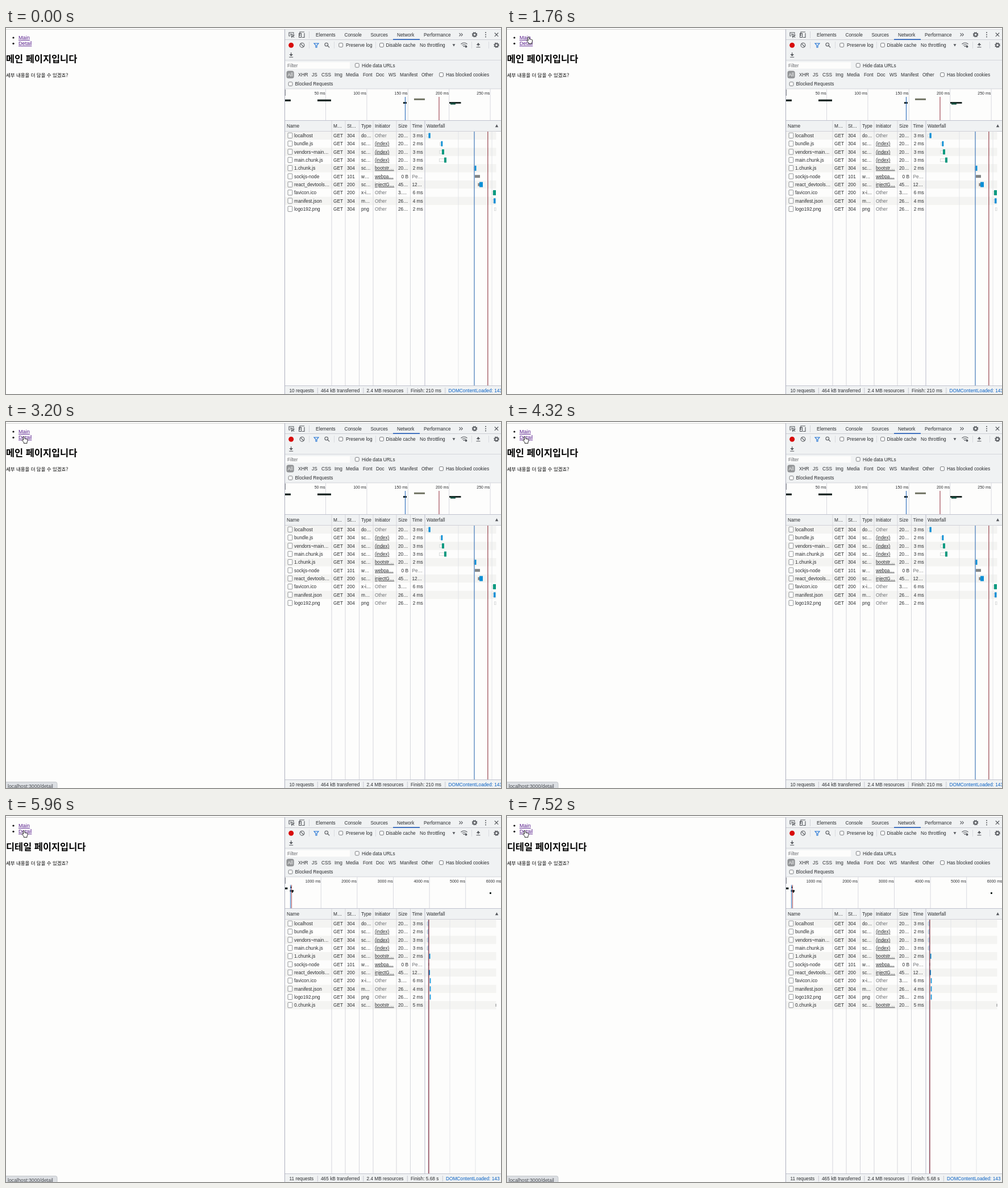
An HTML page that plays this animation: 871 by 643 pixels, repeating every 7.54 s.

```html
<!DOCTYPE html>
<html lang="ko">
<head>
<meta charset="utf-8">
<style>
html, body { margin: 0; width: 100%; height: 100%; overflow: hidden; background: #fdfdfc; }
svg { display: block; }
text { font: 8.3px "Liberation Sans", Arial, sans-serif; fill: #2b2d30; white-space: pre; }
.ko { font: 8.47px "Noto Sans CJK KR", "Noto Sans CJK", sans-serif; fill: #000; }
.h1 { font-size: 16.4px; font-weight: 700; }
.link { font-size: 9.15px; fill: #551a8b; text-decoration: underline; }
.tick { font-size: 7px; }
.u { text-decoration: underline; }
.url { font-size: 8.75px; fill: #4a4d52; }
.line { fill: none; stroke: #55585d; stroke-width: 1.1; }
</style>
</head>
<body>
<svg id="stage" width="871" height="643" viewBox="0 0 871 643"></svg>
<script>
const LOOP = 7540, SWAP = 5180;
const BLUE = '#0b8fd6', GREEN = '#0a9a80', GREY = '#808486', INK = '#16211f', BAR = '#f0f2f3';

const rect = (x, y, w, h, fill, more = '') =>
  `<rect x="${x}" y="${y}" width="${w}" height="${h}" fill="${fill}" ${more}/>`;
const text = (x, y, s, cls = '', more = '') => `<text x="${x}" y="${y}" class="${cls}" ${more}>${s}</text>`;
const right = (x, y, s, cls = '') => text(x, y, s, cls, 'text-anchor="end"');
const path = (d, more = '') => `<path class="line" d="${d}" ${more}/>`;
const circle = (x, y, r, style) => `<circle cx="${x}" cy="${y}" r="${r}" style="${style}"/>`;
const vline = (x, y, h, color = '#d0d2d8', w = 1) => rect(x - w / 2, y, w, h, color);
const box = (x, y) => rect(x - 3.4, y - 3.4, 6.8, 6.8, '#fdfdfc', 'rx="1.5" stroke="#6c6f73" stroke-width=".9"');
const gear = (x, y) => circle(x, y, 2.8, 'fill:none;stroke:#55585d;stroke-width:1.8') +
  circle(x, y, 4.2, 'fill:none;stroke:#55585d;stroke-width:1.3;stroke-dasharray:1.65 1.65');
const each = (list, fn) => list.map(fn).join('');

function page() {
  return rect(0, 2, 490, 1, '#d3d4d3') +
    circle(13, 17, 1.6, 'fill:#111') + circle(13, 27.3, 1.6, 'fill:#111') +
    text(22, 20, 'Main', 'link') + text(22, 30.3, 'Detail', 'link') +
    text(0, 86, '세부 내용을 더 담을 수 있겠죠?', 'ko');
}

function icons() {
  return path('M500 14H498V8H506V10.5M501 10.5L507 12.6L504.3 13.7L503 16.6ZM504.3 13.7L507 16.5') +
    path('M517 14V7H525M515.6 9.5H519.6V16.5H515.6ZM521 16.5H525V9') +
    path('M797.5 9L800 11.7L797.5 14.4M800.8 9L803.3 11.7L800.8 14.4') +
    gear(824.5, 11.7) + each([8, 11.7, 15.4], y => circle(844, y, 1, 'fill:#55585d')) +
    path('M859.8 8.5L866.2 14.9M866.2 8.5L859.8 14.9') +
    circle(501.7, 30.2, 4.5, 'fill:#d80b0b') +
    circle(521, 30.2, 3.9, 'fill:none;stroke:#55585d;stroke-width:1.1') + path('M518.3 27.4L523.8 33') +
    path('M542 27H550L547 30.5V34H545V30.5Z', 'style="stroke:#1a6fd4"') +
    circle(563.8, 29, 2.8, 'fill:none;stroke:#55585d;stroke-width:1.1') + path('M565.8 31L569.2 34.4') +
    path('M785.6 28.2H790.4L788 32.4Z', 'style="fill:#55585d;stroke:none"') +
    path('M800.5 28.2Q806 23.8 811.5 28.2M802.5 30.4Q806 27.6 809.5 30.4M804.5 32.5Q806 31.3 807.5 32.5') +
    circle(809.5, 32.7, 1.9, 'fill:#55585d') +
    path('M827.5 33.8H834.5M831 32V28', 'stroke-width="1.5"') +
    path('M827.7 30L831 26L834.3 30Z', 'style="fill:#55585d;stroke:none"') + gear(863, 30.2) +
    path('M498.2 51.3H505.2M501.7 43V47', 'stroke-width="1.5"') +
    path('M498.4 46L501.7 49.8L505 46Z', 'style="fill:#55585d;stroke:none"');
}

function panel() {
  const tabs = [[545, 'Elements'], [595.5, 'Console'], [641.5, 'Sources'], [688, 'Network'], [735, 'Performance']];
  const kinds = [[514, 'XHR'], [538, 'JS'], [555, 'CSS'], [578, 'Img'], [598, 'Media'], [628, 'Font'],
    [651, 'Doc'], [673, 'WS'], [693, 'Manifest'], [731, 'Other']];
  const heads = [[494, 'Name'], [576, 'M…'], [600, 'St…'], [625, 'Type'], [649, 'Initiator'],
    [690, 'Size'], [714.5, 'Time'], [740, 'Waterfall']];
  return rect(491, 2, 380, 105, BAR) + rect(491, 2, 380, 1, '#d3d4d9') +
    rect(491, 20, 380, 1, '#cbcdd4') + rect(681, 19.4, 47, 1.6, '#1c57b5') +
    each(tabs, ([x, s]) => text(x, 14.6, s)) +
    vline(533.5, 6, 12) + each([533.5, 577.5, 650.5, 819.5, 849.5], x => vline(x, 24, 12, '#d9dbe0')) + icons() +
    box(589.2, 30) + text(598, 33, 'Preserve log') + box(661, 30) + text(668.5, 33, 'Disable cache') +
    text(728, 33, 'No throttling') +
    rect(491, 56, 380, 1, '#d3d5db') + rect(492, 60, 113, 11.5, '#fdfdfc') +
    text(495, 69, 'Filter', '', 'style="fill:#66696d"') +
    box(617.8, 65.6) + text(626, 68.6, 'Hide data URLs') +
    rect(493.5, 75.3, 13.2, 13.2, '#929496', 'rx="3.5"') + text(495.5, 85, 'All', '', 'style="fill:#fff"') +
    each(kinds, ([x, s]) => text(x, 85, s)) +
    box(766, 82) + text(774, 85, 'Has blocked cookies') + box(500.5, 98.3) + text(508.5, 101.3, 'Blocked Requests') +
    rect(491, 106.5, 380, .8, '#cbcdd4') + rect(491, 162, 380, 19.5, BAR) +
    rect(491, 162, 380, 1, '#c0c2ce') + rect(491, 181, 380, 1, '#c6c8d0') +
    each(heads, ([x, s]) => text(x, 175, s)) +
    path('M860.8 174.3H866.2L863.5 169.3Z', 'style="fill:#55585d;stroke:none"') +
    rect(491, 628, 380, 15, BAR) + rect(491, 628, 380, 1, '#c0c2ce') +
    vline(490.5, 2, 641, '#aeb0bf');
}

const files = [
  ['localhost', 304, 'do…', 'Other', '20…', '3 ms'],
  ['bundle.js', 304, 'sc…', '(index)', '20…', '2 ms'],
  ['vendors~main…', 304, 'sc…', '(index)', '20…', '3 ms'],
  ['main.chunk.js', 304, 'sc…', '(index)', '20…', '3 ms'],
  ['1.chunk.js', 304, 'sc…', 'bootstr…', '20…', '2 ms'],
  ['sockjs-node', 101, 'w…', 'webpa…', '0 B', 'Pe…'],
  ['react_devtools…', 200, 'sc…', 'injectG…', '45…', '12…'],
  ['favicon.ico', 200, 'x-i…', 'Other', '3.…', '6 ms'],
  ['manifest.json', 304, 'm…', 'Other', '26…', '4 ms'],
  ['logo192.png', 304, 'png', 'Other', '26…', '2 ms'],
  ['0.chunk.js', 304, 'sc…', 'bootstr…', '20…', '5 ms']
];

function table(count, bars, grid) {
  const top = i => 181.8 + i * 14.34;
  const row = ([name, status, type, from, size, time], i) => {
    const y = top(i) + 10.1, gray = 'style="fill:#6f7276"';
    return rect(496, y - 7.7, 7.8, 9.2, '#fdfdfc', 'rx="1" stroke="#85888c" stroke-width=".9"') +
      text(507, y, name) + text(576, y, 'GET') + text(600, y, status) + text(625, y, type) +
      (from == 'Other' ? text(649, y, from, '', gray) : text(649, y, from, 'u')) +
      (size == '0 B' ? right(708, y, size) : text(690, y, size)) +
      (time.endsWith('…') ? text(714.5, y, time, '', time == 'Pe…' ? gray : '') : right(733.7, y, time));
  };
  let out = '';
  for (let i = 0; i < count; i += 2) out += rect(491, top(i), 371.5, 14.34, '#f4f4f2');
  out += each([573, 597, 621.5, 646, 687, 711.5], x => vline(x, 163, 465, '#d5d6dc')) + vline(737, 163, 465, '#b9bbc9');
  out += each(grid, x => vline(x, 182, 446, '#e1e2e6', .9));
  out += each(files.slice(0, count), row);
  // each bar: row, waiting start, active start, end, colour
  return out + each(bars, ([i, wait, x, end, color, h = 9]) =>
    (wait < x ? rect(wait, top(i) + 5, x - wait, 5, '#fdfdfc', 'stroke="#c9cccd" stroke-width=".7"') : '') +
    rect(x, top(i) + 7.2 - h / 2, end - x, h, color));
}

function overview(ticks, step, first, unit) {
  let out = '';
  for (let i = 0; i < ticks; i++) {
    const x = first + i * step;
    out += vline(x, 107, 55, '#d9dae0') + right(x - .8, 117, `${(i + 1) * unit} ms`, 'tick');
  }
  return out + vline(491.5, 108, 11, '#8d9094');
}

function footer(cells) {
  return each(cells, ([x, s], i) => (i ? vline(x - 5.7, 632, 10, '#c6c8d0') : '') +
    text(x, 640.2, s, '', s.startsWith('DOM') ? 'style="fill:#0b62c4"' : ''));
}

function before() {
  const bars = [[0, 740.5, 743.5, 746.8, BLUE], [1, 763.5, 765.5, 768.3, BLUE], [2, 763, 767, 771, GREEN],
    [3, 762.5, 771, 775, GREEN], [4, 823, 824.5, 827.5, BLUE], [5, 825, 825, 834, GREY, 5],
    [6, 830.5, 833, 839, BLUE], [7, 855, 857, 862, GREEN], [8, 856, 858, 861.5, BLUE], [9, 859.5, 862, 862, GREY]];
  return text(0, 60.3, '메인 페이지입니다', 'ko h1') + overview(5, 72.4, 562.5, 50) +
    rect(491, 125.6, 10, 3.2, INK) + rect(548, 125.6, 24, 3.2, INK) + rect(699, 130, 6, 3, INK) +
    rect(718, 123.8, 19, 2.9, '#6d705f') + rect(780, 130, 20.5, 2.8, INK) + rect(782, 131.5, 9, 3, '#124f40') +
    vline(702.5, 121, 41, '#3a76c0', 1.2) + vline(762, 121, 41, '#a34c58', 1.2) +
    table(10, bars, [796, 855]) + rect(830.5, 272.7, 2.5, 5, GREY) +
    vline(824, 182, 446, '#4f82bd', 1.3) + vline(847.8, 182, 446, '#a0525c', 1.3) +
    footer([[498.5, '10 requests'], [554, '464 kB transferred'], [634.5, '2.4 MB resources'],
      [712, 'Finish: 210 ms'], [778.5, 'DOMContentLoaded: 143 ms']]);
}

function after() {
  const bars = [];
  for (let i = 0; i < 4; i++) bars.push([i, 740.3, 742, 743.5, '#7fb9e2']);
  bars.push([4, 744.5, 744.5, 746.5, BLUE], [5, 743, 743, 744.5, GREY, 5], [6, 743, 743, 746, BLUE]);
  for (let i = 7; i < 10; i++) bars.push([i, 745.7, 745.7, 747.4, BLUE]);
  bars.push([10, 861.5, 861.5, 862.5, GREY, 5]);
  return text(0, 60.3, '디테일 페이지입니다', 'ko h1') + overview(6, 63.6, 554.3, 1000) +
    rect(491, 125.6, 4.5, 3.2, INK) + rect(499.5, 130, 6.5, 3.2, INK) + rect(502, 132, 3, 2.6, INK) +
    rect(500, 124, 3, 2.5, INK) + rect(851, 134, 2.8, 3, INK) +
    vline(500.5, 121, 41, '#3a76c0') + vline(502.5, 121, 41, '#a34c58') +
    table(11, bars, [781, 826]) +
    vline(743, 182, 446, '#a9b4cf', .6) + vline(743.9, 182, 446, '#8d3e4c', 1.4) +
    footer([[498.5, '11 requests'], [554, '465 kB transferred'], [634.5, '2.4 MB resources'],
      [712, 'Finish: 5.68 s'], [774, 'DOMContentLoaded: 143 ms']]);
}

const bubble = (w, s) => rect(-2, 632.5, w + 2, 14, '#dcdfe3', 'rx="3" stroke="#bfc2c7" stroke-width=".9"') +
  text(3, 643, s, 'url');

const group = (id, body) => `<g id="${id}">${body}</g>`;
const ink = 'fill="#fff" stroke="#111" stroke-width=".9" stroke-linejoin="round"';
stage.innerHTML = page() + panel() + group('mainView', before()) + group('detailView', after()) +
  group('rootUrl', bubble(66, 'localhost:3000')) + group('detailUrl', bubble(90, 'localhost:3000/detail')) +
  group('pointer',
    `<path id="arrow" d="M0 0V10L2.4 7.8L4 11.4L5.6 10.7L4 7.2H7Z" ${ink}/>` +
    `<path id="hand" d="M-1.3 1Q0-.8 1.3 1L1.7 4.3Q2.7 3.4 3.4 4.6Q4.5 3.8 5.1 5Q6.6 4.5 6.8 6.2Q6.9 8.5 5.7 10V12H0V10.4L-2.8 7Q-3.6 5.4-2.1 5.3L-.6 6.5Z" ${ink}/>`);

const show = (el, on) => el.style.display = on ? '' : 'none';
const stops = [[1400, 56, -13], [1740, 38, 15.6], [2400, 38, 15.6], [2700, 31.3, 25.4], [LOOP, 31.3, 25.4]];

function pointerAt(t) {
  const i = Math.max(1, stops.findIndex(s => t <= s[0]));
  const [t0, x0, y0] = stops[i - 1], [t1, x1, y1] = stops[i];
  const p = Math.max(0, (t - t0) / (t1 - t0)), k = p * p * (3 - 2 * p);
  return [x0 + (x1 - x0) * k, y0 + (y1 - y0) * k];
}

function frame(now) {
  const t = now % LOOP, [x, y] = pointerAt(t), onLink = y > 11, onDetail = y > 21;
  show(mainView, t < SWAP);
  show(detailView, t >= SWAP);
  show(rootUrl, t >= 1900 && !onDetail);
  show(detailUrl, onDetail);
  show(pointer, t >= 1400);
  show(arrow, !onLink);
  show(hand, onLink);
  pointer.setAttribute('transform', `translate(${x} ${y})`);
  requestAnimationFrame(frame);
}
frame(0);
</script>
</body>
</html>
```
